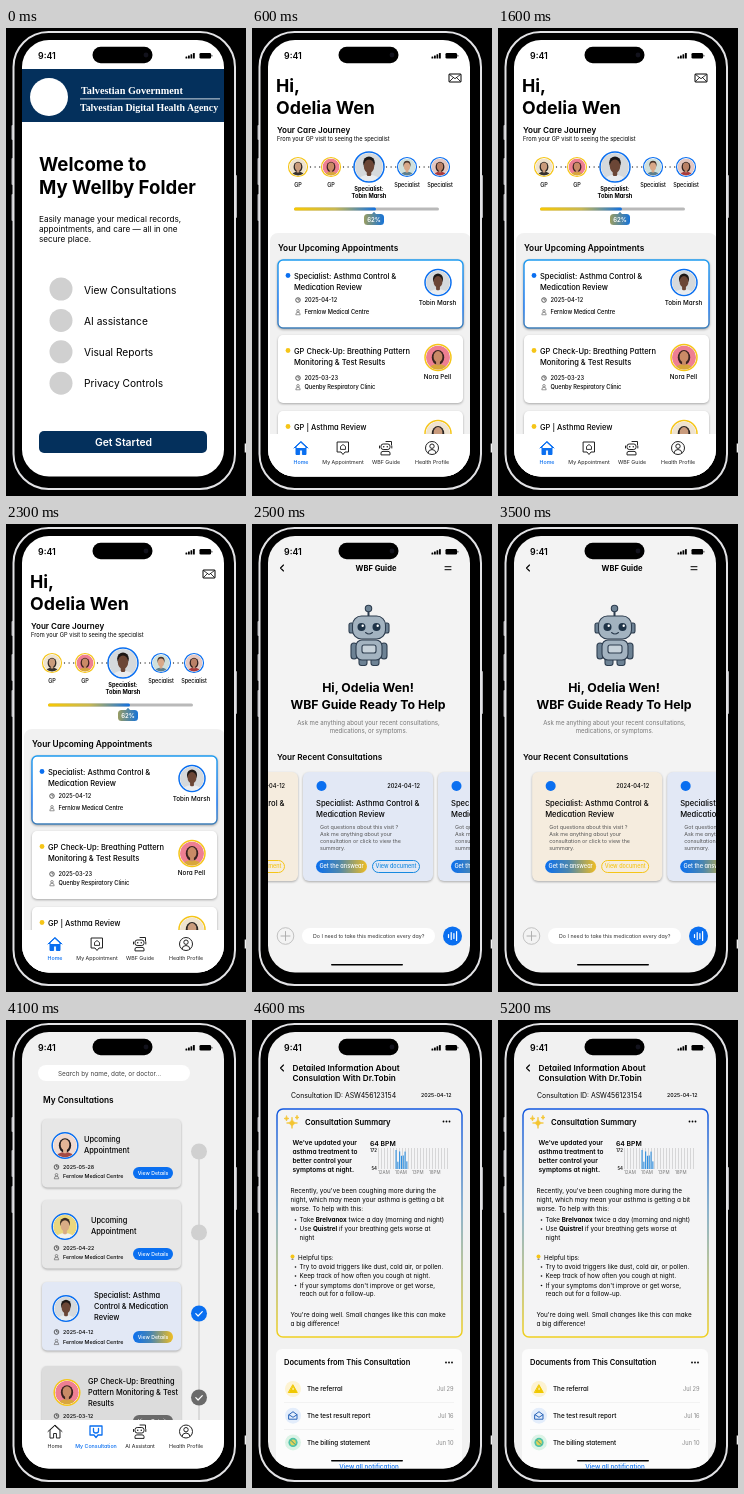
These frames come from a looping animation (240x468 px, 5.3 s). An HTML page:

```html
<!DOCTYPE html>
<html lang="en">
<head>
<meta charset="utf-8">
<title>Health app walkthrough</title>
<style>
html, body { margin: 0; width: 100%; height: 100%; overflow: hidden; background: #000; }
svg { display: block; width: 240px; height: 468px; }
text { font-family: Inter, "Open Sans", sans-serif; }
.serif { font-family: "Liberation Serif", "Noto Serif", serif; }
.screen { visibility: hidden; }
.round text { font-feature-settings: "cv11"; }
.round .plain { font-feature-settings: normal; }
.card { filter: drop-shadow(0 1px 1px rgba(0, 0, 0, .3)); }
#row { animation: slide 5300ms infinite; }
@keyframes slide {
  0%, 60.4% { transform: none; animation-timing-function: ease-in-out; }
  67.9%, 100% { transform: translateX(135px); }
}
</style>
</head>
<body>
<svg id="stage" viewBox="0 0 240 468"></svg>
<script>
const LOOP = 5300;
const BLUE = '#0a6ff0', GOLD = '#f5c518', INK = '#000', MUTED = '#777';

// Drawing helpers
const esc = s => s.replace(/&/g, '&amp;');
const text = (x, y, size, str, { w = 400, fill = INK, at = 'start', cls = '' } = {}) =>
  `<text x="${x}" y="${y}" font-size="${size}" font-weight="${w}" fill="${fill}" text-anchor="${at}" class="${cls}">${esc(str)}</text>`;
const lines = (x, ys, size, strs, opt) => strs.map((s, i) => text(x, ys[i], size, s, opt)).join('');
const rect = (x, y, w, h, r, fill, more = '') =>
  `<rect x="${x}" y="${y}" width="${w}" height="${h}" rx="${r}" fill="${fill}" ${more}/>`;
const dot = (x, y, r, fill, more = '') => `<circle cx="${x}" cy="${y}" r="${r}" fill="${fill}" ${more}/>`;
const path = (d, stroke = INK, sw = 1, fill = 'none') =>
  `<path d="${d}" fill="${fill}" stroke="${stroke}" stroke-width="${sw}" stroke-linecap="round" stroke-linejoin="round"/>`;
const dots = (x, y, gap, r, fill) => [0, 1, 2].map(i => dot(x + i * gap, y, r, fill)).join('');
const page = fill => rect(16, 12, 202, 437, 0, fill);
const grad = (id, stops, vertical) =>
  `<linearGradient id="${id}" x2="${vertical ? 0 : 1}" y2="${vertical ? 1 : 0}">${
    stops.map(([o, c]) => `<stop offset="${o}" stop-color="${c}"/>`).join('')}</linearGradient>`;

// Faceless portraits: backdrop, skin, hair, clothes, long hair
const PEOPLE = {
  veil: ['#efe3cf', '#c99b7c', '#2a2523', '#35302d', 1],
  pink: ['#ee7f92', '#c98a66', '#3a2220', '#d8a63c', 1],
  man: ['#d5d9dc', '#6b4636', '#1d1715', '#e9ecef', 0],
  pale: ['#cfe0dc', '#d8a888', '#4a352b', '#5d7f8c', 0],
  red: ['#e5c7c0', '#b98066', '#2b1d1c', '#a83a3c', 1],
  bob: ['#f0d9cf', '#e3b596', '#211a1a', '#a34b45', 1],
  sun: ['#ead77e', '#d9ac85', '#3b2b22', '#f2f2ee', 0]
};
function face(x, y, r, ring, who) {
  const [bg, skin, hair, cloth, long] = PEOPLE[who];
  return dot(x, y, r, '#fff', `stroke="${ring}" stroke-width="${r > 11 ? 1.5 : 1.2}"`) +
    `<g transform="translate(${x} ${y}) scale(${r - 1})" clip-path="url(#disc)">${dot(0, 0, 1, bg)}
    <ellipse cx="0" cy="${long ? 0 : -.3}" rx="${long ? .52 : .42}" ry="${long ? .62 : .45}" fill="${hair}"/>
    <ellipse cx="0" cy="1.05" rx=".8" ry=".5" fill="${cloth}"/>
    ${rect(-.16, .2, .32, .45, .1, skin)}<ellipse cx="0" cy="-.06" rx=".37" ry=".48" fill="${skin}"/></g>`;
}

const clock = (x, y) => dot(x, y, 2.3, 'none', 'stroke="#222" stroke-width=".7"') + path(`M${x} ${y - 1.3}V${y}H${x + 1.1}`, '#222', .6);
const person = (x, y) => dot(x, y - 1.2, 1.3, 'none', 'stroke="#555" stroke-width=".6"') +
  path(`M${x - 2.2} ${y + 2.4}q0 -2.3 2.2 -2.3t2.2 2.3z`, '#555', .6);
const meta = (x, y1, y2, size, date, place) =>
  clock(x, y1 - 2) + person(x, y2 - 2) + text(x + 6.5, y1, size, date, { w: 500 }) + text(x + 6.5, y2, size, place, { w: 500 });
const pill = (x, y, w, h, fill, label, size = 5.2) =>
  rect(x, y, w, h, h / 2, fill) + text(x + w / 2, y + h / 2 + 1.9, size, label, { w: 500, fill: '#fff', at: 'middle' });
const chevron = y => path(`M31.5 ${y - 3}l-3 3l3 3`, INK, 1.1);
const homeBar = rect(79, 440, 72, 1.6, .8, INK);

// Tab bar
const ICONS = {
  home: (x, y, c, on) => path(`M${x - 7} ${y}l7 -6.5l7 6.5M${x - 5} ${y - 1}v7.5h3.6v-4.5h2.8v4.5h3.6v-7.5l-5 -4.6z`, c, 1, on ? c : 'none'),
  visit: (x, y, c) => path(`M${x - 5.5} ${y - 6}h11v10h-3.5l-2 2.5l-2 -2.5h-3.5z`, c, 1) + path(`M${x - 2.5} ${y + 1}v-2.5l2.5 -2l2.5 2v2.5z`, c, .9),
  notes: (x, y, c) => path(`M${x - 6} ${y - 5.5}h12v9h-4l-2 2.5l-2 -2.5h-4z`, c, 1.3) + path(`M${x - 2.5} ${y - 3}v2.5q0 2 2.5 2t2.5 -2v-2.5`, c, 1.3),
  bot: (x, y, c) => rect(x - 5, y - 4, 9, 5.5, 2.2, 'none', `stroke="${c}"`) + dot(x - 2.3, y - 1.2, .8, c) + dot(x + 1.3, y - 1.2, .8, c) +
    path(`M${x} ${y - 6.5}h5.5v3.5M${x - 6.5} ${y - 2}v2M${x + 5.8} ${y - 2}v2M${x - 5} ${y + 6.5}v-1.5q0 -1.6 2 -1.6h5q2 0 2 1.6v1.5z`, c, 1),
  user: (x, y, c) => dot(x, y, 6.5, 'none', `stroke="${c}"`) + dot(x, y - 1.8, 2.2, 'none', `stroke="${c}"`) + path(`M${x - 4} ${y + 4.8}q.5 -3.3 4 -3.3t4 3.3`, c, 1)
};
const tabs = (top, iconY, labelY, items, active) => rect(16, top, 202, 52, 0, '#fff') +
  items.map(([x, icon, label], i) => {
    const on = i === active, c = on ? BLUE : '#222';
    return ICONS[icon](x, iconY, c, on) + text(x, labelY, 5.3, label, { fill: c, at: 'middle', w: on ? 500 : 400 });
  }).join('');

function welcome() {
  const items = ['View Consultations', 'AI assistance', 'Visual Reports', 'Privacy Controls'];
  const white = { w: 700, fill: '#fff', cls: 'serif' };
  return page('#fff') + rect(16, 41, 202, 53, 0, '#04305c') + dot(43, 69, 19, '#fff') +
    text(75, 66, 10.2, 'Talvestian Government', white) + rect(74, 70.5, 140, .8, 0, '#fff') +
    text(74, 83, 9.9, 'Talvestian Digital Health Agency', white) +
    lines(33, [142.5, 166], 18.6, ['Welcome to', 'My Wellby Folder'], { w: 700 }) +
    lines(33, [194, 204, 214], 8.2, ['Easily manage your medical records,', 'appointments, and care — all in one', 'secure place.']) +
    items.map((s, i) => dot(55, 261 + i * 31.4, 11.5, '#d0d0d0') + text(78, 265.5 + i * 31.2, 10.2, s)).join('') +
    rect(33, 403, 168, 22, 5, '#04305c') + text(117.5, 418, 10.4, 'Get Started', { w: 600, fill: '#fff', at: 'middle' });
}

function visitCard(y, color, title, who, name, info = '', lit = false) {
  return `<g class="card">${rect(26, y, 185, 68, 5, '#fff', lit ? 'stroke="url(#edge)" stroke-width="1.4"' : '')}</g>` +
    dot(36, y + 15.5, 2.4, color) + lines(42, [y + 18.5, y + 29.5], 7.5, title, { w: 500 }) + info +
    face(186, y + 22.5, 13, color, who) + text(185.5, y + (lit ? 45 : 44), 6.3, name, { w: 500, at: 'middle' });
}

function home() {
  const mid = { at: 'middle', w: 500 }, bold = { at: 'middle', w: 700 };
  const steps = [[46, 'veil', 'GP'], [79, 'pink', 'GP'], [155, 'pale', 'Specialist'], [188, 'red', 'Specialist']];
  return page('#fff') + lines(24, [64, 86], 17.8, ['Hi,', 'Odelia Wen'], { w: 700, cls: 'plain' }) +
    rect(197, 46, 12, 8, .5, 'none', 'stroke="#000" stroke-width="1"') + path('M197.5 46.5l5.5 4.2l5.5 -4.2M197.5 53.5l4 -4M208.5 53.5l-4 -4', INK, .8) +
    text(25, 104.5, 8.1, 'Your Care Journey', { w: 600 }) +
    text(25, 113, 5.7, 'From your GP visit to seeing the specialist') +
    steps.map(([x, who, s], i) => face(x, 139, 9.5, i < 2 ? GOLD : BLUE, who) + text(x, 159, 5.5, s, mid)).join('') +
    face(117, 139, 15, BLUE, 'man') +
    [58.5, 91.5, 134.5, 167.5].map(x => dots(x, 139, 4.6, .65, '#333')).join('') +
    lines(117, [163, 170], 5.7, ['Specialist:', 'Tobin Marsh'], bold) +
    rect(42, 179.4, 145, 3, 1.5, '#b9b9b9') + rect(42, 179.4, 82, 3, 1.5, 'url(#warm)') +
    path('M119.5 187l2.5 -3l2.5 3z', '#4c86ad', .5, '#4c86ad') + rect(112, 186, 20, 11, 3.5, 'url(#badge)') +
    text(122, 193.8, 6, '62%', { w: 600, fill: '#fff', at: 'middle' }) +
    rect(18, 205, 201, 210, 8, '#f1f1f1') + text(26, 223, 8.3, 'Your Upcoming Appointments', { w: 600 }) +
    visitCard(232, BLUE, ['Specialist: Asthma Control &', 'Medication Review'], 'man', 'Tobin Marsh',
      meta(46, 274, 286, 5.7, '2025-04-12', 'Fernlow Medical Centre'), true) +
    visitCard(307, GOLD, ['GP Check-Up: Breathing Pattern', 'Monitoring & Test Results'], 'pink', 'Nora Pell',
      meta(46, 352, 361, 5.7, '2025-03-23', 'Quenby Respiratory Clinic')) +
    visitCard(383, GOLD, ['GP | Asthma Review'], 'veil', '') +
    tabs(406, 420, 436, [[49, 'home', 'Home'], [91, 'visit', 'My Appointment'], [134, 'bot', 'WBF Guide'], [180, 'user', 'Health Profile']], 0);
}

function robot() {
  const line = '#2d3d4f', metal = '#a3b3c0', dark = '#6d8294', s = `stroke="${line}" stroke-width="1.1"`;
  return path('M116.5 87v6', line, 2) + dot(116.5, 84.5, 3.2, dark, s) +
    rect(97, 99, 5, 10, 2, dark, s) + rect(132, 99, 5, 10, 2, dark, s) +
    rect(99, 119, 6, 16, 3, dark, s) + rect(129, 119, 6, 16, 3, dark, s) +
    rect(107, 132, 8, 9.5, 2.5, dark, s) + rect(119, 132, 8, 9.5, 2.5, dark, s) +
    rect(104, 116, 26, 20, 6, metal, s) + rect(110, 121, 14, 8, 2, '#c7d2da', s) +
    rect(100.5, 92, 33, 23, 9, metal, s) +
    [109.5, 124.5].map(x => dot(x, 103, 4, '#1f3448') + dot(x + 1.2, 101.7, 1.2, '#fff')).join('') + path('M113.5 108.5q3.5 3 7 0', line, 1.1);
}

function chatCard(x, fill, edge) {
  return `<g class="card">${rect(x, 248, 130, 109, 6, fill)}</g>` + dot(x + 18.5, 262, 5, BLUE) +
    text(x + 117, 264, 5.7, '2024-04-12', { w: 500, at: 'end' }) +
    lines(x + 13, [282, 293], 7.6, ['Specialist: Asthma Control &', 'Medication Review'], { w: 500 }) +
    lines(x + 17, [304.5, 311.5, 318.5, 325.5], 5.4, ['Got questions about this visit ?', 'Ask me anything about your',
      'consultation or click to view the', 'summary.'], { fill: '#555' }) +
    pill(x + 13, 336, 51, 13, 'url(#cool)', 'Get the answear', 5.6) +
    rect(x + 69.5, 336.5, 47, 12, 6, 'none', `stroke="${edge}"`) + text(x + 93, 344.4, 5.5, 'View document', { w: 500, fill: edge, at: 'middle' });
}

function buddy() {
  const mid = w => ({ w, at: 'middle', cls: 'plain' });
  return page('#f3f3f3') + chevron(44) + text(124, 47, 7.6, 'WBF Guide', mid(700)) +
    path('M193 42.7h6M193 45.7h6', INK, 1) + robot() +
    lines(116, [168, 185], 12.3, ['Hi, Odelia Wen!', 'WBF Guide Ready To Help'], mid(700)) +
    lines(116.5, [201, 209], 6.1, ['Ask me anything about your recent consultations,', 'medications, or symptoms.'], { at: 'middle', fill: MUTED, cls: 'plain' }) +
    text(25, 236, 8.2, 'Your Recent Consultations', { w: 600 }) +
    `<g id="row">${chatCard(-84, '#f5ecde', GOLD)}${chatCard(51, '#e2e8f5', '#1689e0')}${chatCard(186, '#e2e8f5', '#1689e0')}</g>` +
    dot(33.5, 412, 8.3, 'none', 'stroke="#bbb" stroke-width=".9"') + path('M29 412h9M33.5 407.5v9', '#aaa', .9) +
    rect(50, 404, 133, 16, 8, '#fff') + text(61, 414, 5.3, 'Do I need to take this medication every day?', { fill: '#333' }) +
    dot(200.5, 412, 9.5, BLUE) + path('M196.5 410.5v3M199.2 408.5v7M201.9 409.5v5M204.6 407.5v9', '#fff', 1.2) + homeBar;
}

function consults() {
  // top, fill, portrait, portrait x, title x, first baseline, title, date, button fill, meta shift
  const cards = [
    [99, '#e7e7e7', 'bob', 59, 78, 122, ['Upcoming', 'Appointment'], '2025-05-28', BLUE, 0],
    [180, '#e7e7e7', 'sun', 59, 85, 202.5, ['Upcoming', 'Appointment'], '2025-04-22', BLUE, 0],
    [262, '#e2e8f5', 'man', 60, 88, 278, ['Specialist: Asthma', 'Control & Medication', 'Review'], '2025-04-12', 'url(#cool)', 2],
    [346, '#dcdcdc', 'pink', 61, 82, 364, ['GP Check-Up: Breathing', 'Pattern Monitoring & Test', 'Results'], '2025-03-12', '#6a6a6a', 2]
  ];
  return page('#f1f1f1') + rect(32, 45, 152, 16, 8, '#fff') +
    text(52, 55.5, 6.4, 'Search by name, date, or doctor...', { fill: '#444' }) +
    text(37, 82.5, 8.3, 'My Consultations', { w: 600 }) + rect(192.4, 132, 1.2, 270, 0, '#cacaca') +
    cards.map(([y, fill, who, fx, tx, ty, title, date, btn, sh], i) =>
      `<g class="card">${rect(36, y, 139, 68.5, 5, fill)}</g>` +
      face(fx, y + 26.5, 12.8, i === 3 ? GOLD : BLUE, who) + lines(tx, [ty, ty + 11, ty + 22], 7.4, title, { w: 500 }) +
      meta(50.5, y + 50 + sh, y + 59 + sh * 1.4, 5.3, date, 'Fernlow Medical Centre') + pill(127, y + 48 + sh / 2, 40, 12, btn, 'View Details') +
      dot(193, y + 32.5 - sh / 2, 8, ['#d0d0d0', '#d0d0d0', BLUE, '#6a6a6a'][i]) +
      (i > 1 ? path(`M189.8 ${y + 31.7}l2.3 2.3l4.2 -4.4`, '#fff', 1.2) : '')).join('') +
    tabs(400, 411.5, 428, [[49, 'home', 'Home'], [90, 'notes', 'My Consultation'], [134, 'bot', 'AI Assistant'], [180, 'user', 'Health Profile']], 1);
}

function chart() {
  let s = '';
  for (let i = 0; i < 24; i++) s += rect(126 + i * 3, 128, .6, 21, 0, '#c2c2c4');
  for (let i = 0; i < 7; i++) {
    const h = 4 + 15 * Math.abs(Math.cos(i * 1.35));
    s += rect(143.5 + i * 1.8, 149 - h, 1.1, h, 0, '#2f8fe0');
  }
  return s + text(118, 126, 6.8, '64 BPM', { w: 600 }) + text(125, 132, 4.4, '172', { at: 'end', w: 500 }) + text(125, 150, 4.4, '54', { at: 'end', w: 500 }) +
    ['12AM', '10AM', '13PM', '18PM'].map((l, i) => text(126 + i * 17, 154, 4.5, l, { fill: MUTED })).join('');
}

const spark = (x, y, r, c) => path(`M${x} ${y - r}Q${x} ${y} ${x + r} ${y}Q${x} ${y} ${x} ${y + r}Q${x} ${y} ${x - r} ${y}Q${x} ${y} ${x} ${y - r}z`, c, .7, c);
const bold = s => `<tspan font-weight="700">${s}</tspan>`;

function detail() {
  const rows = [['The referral', 'Jul 29', '#fdf3d2'], ['The test result report', 'Jul 16', '#e3edfb'], ['The billing statement', 'Jun 10', '#dcf3e6']];
  const bullets = [[202, `Take ${bold('Brelvanox')} twice a day (morning and night)`], [211, `Use ${bold('Quistrel')} if your breathing gets worse at`],
    [249, 'Try to avoid triggers like dust, cold air, or pollen.'], [258, 'Keep track of how often you cough at night.'],
    [267.5, "If your symptoms don't improve or get worse,"]];
  return page('#f1f1f1') + chevron(48) +
    lines(40.5, [50.5, 61], 8.2, ['Detailed Information About', 'Consulation With Dr.Tobin'], { w: 600 }) +
    text(39, 78, 6.9, 'Consultation ID: ASW456123154') + text(199.5, 77.3, 5.3, '2025-04-12', { w: 500, at: 'end' }) +
    rect(25, 89, 185, 228, 6, '#f4f4f5', 'stroke="url(#frame)" stroke-width="1.5"') +
    spark(40, 103, 5.5, '#f4c430') + spark(34.5, 98.5, 2.5, '#f4c430') + spark(45, 97.5, 2, '#f4c430') +
    text(53, 105, 7.7, 'Consultation Summary', { w: 600 }) + dots(191.5, 101.5, 3, .9, INK) +
    lines(40.5, [125, 134, 143, 152], 6.6, ["We've updated your", 'asthma treatment to', 'better control your', 'symptoms at night.'], { w: 600 }) + chart() +
    lines(38.5, [172.5, 182, 191], 6.35, ["Recently, you've been coughing more during the", 'night, which may mean your asthma is getting a bit', 'worse. To help with this:']) +
    bullets.map(([y, s]) => dot(43.5, y - 2, .8, INK) + text(47.5, y, 6.3, s)).join('') + text(47.5, 220, 6.3, 'night') +
    dot(40.5, 236.5, 2, GOLD) + rect(39.5, 238.4, 2, 1.7, .5, '#888') + text(46, 239.5, 6.3, 'Helpful tips:') +
    text(47.5, 276, 6.3, 'reach out for a follow-up.') +
    lines(38.5, [297, 305.5], 6.35, ["You're doing well. Small changes like this can make", 'a big difference!']) +
    rect(24, 329, 186, 130, 6, '#fcfcfc') + text(32, 344.7, 7.5, 'Documents from This Consultation', { w: 600 }) + dots(194, 342.5, 3, .9, INK) +
    rows.map(([s, d, bg], i) => {
      const y = 369 + i * 26.7;
      const icon = [path(`M41 ${y - 4}l4.3 7.5h-8.6z`, '#f0c800', 1, '#f0c800') + rect(40.6, y - 1.5, .9, 2.6, .4, '#fff'),
        path(`M37 ${y - 1}l4 -3l4 3v4.5h-8zl4 2.6l4 -2.6`, '#2763b8', 1),
        dot(41, y, 4.6, '#4fc3a8') + dot(41, y, 2.8, '#e4d35a') + path(`M39 ${y - 2}l4 4`, '#2f9c86', 1)][i];
      return dot(41, y, 8, bg) + icon + text(55, y + 2.3, 6.3, s, { w: 500 }) + text(201.5, y + 2.2, 5.7, d, { fill: '#888', at: 'end' }) +
        (i < 2 ? rect(32, y + 13.3, 170, .6, 0, '#ececec') : '');
    }).join('') + text(117, 449, 6.3, 'View all notification', { w: 500, fill: BLUE, at: 'middle' }) + homeBar;
}

const status = text(32, 31.3, 8.8, '9:41', { w: 600 }) +
  [0, 1, 2, 3].map(i => rect(179.5 + i * 2.5, 28.6 - i * 1.2, 1.8, 2 + i * 1.2, .4, INK)).join('') +
  rect(193.5, 25, 11.5, 5.6, 1.3, INK) + rect(205.5, 26.7, .8, 2, .4, INK) +
  rect(86.5, 18.8, 60, 16.4, 8.2, '#000') + dot(140, 27, 2.4, '#12121c');

const shell = [[5.5, 97, 15], [5.5, 130, 27], [5.5, 166, 27], [229, 147, 43]].map(([x, y, h]) => rect(x, y, 2, h, 1, '#b0b0b4')).join('') +
  rect(7.5, 4, 221.5, 457, 35, '#000', 'stroke="#e2e2e5" stroke-width="2"') + rect(238.7, 415.5, 1.3, 9, 0, '#f0f0f0');

const defs = `<defs><clipPath id="disc"><circle r="1"/></clipPath>
  <clipPath id="glass"><rect x="16" y="12" width="202" height="436.5" rx="27"/></clipPath>
  ${grad('warm', [[0, '#f8c800'], [.5, '#c9b850'], [1, '#0f6fe0']])}${grad('badge', [[0, '#9a9d62'], [1, '#1673d8']])}
  ${grad('cool', [[0, BLUE], [.45, '#4b86ae'], [1, '#f0bd22']])}${grad('edge', [[0, '#1d9bf0'], [.7, BLUE], [1, '#3f7fb8']], true)}
  ${grad('frame', [[0, '#1258e0'], [.45, '#6d9fc0'], [1, '#f0d020']], true)}</defs>`;

// Each screen is shown from its own time until the next one starts
const screens = [[0, welcome], [400, home], [2400, buddy], [3800, consults], [4500, detail]];
const pct = ms => (ms / LOOP * 100).toFixed(3) + '%';
let css = '', body = '';
screens.forEach(([from, draw], i) => {
  const to = i + 1 < screens.length ? screens[i + 1][0] : LOOP;
  css += `@keyframes s${i} { ${from ? '0% { visibility: hidden }' : ''} ${pct(from)} { visibility: visible } ${
    to < LOOP ? pct(to) + ' { visibility: hidden }' : ''} 100% { visibility: ${to < LOOP ? 'hidden' : 'visible'} } }\n`;
  body += `<g class="screen ${i ? 'round' : ''}" style="animation: s${i} ${LOOP}ms step-end infinite">${draw()}</g>`;
});
document.head.appendChild(document.createElement('style')).textContent = css;
document.getElementById('stage').innerHTML = defs + shell + `<g clip-path="url(#glass)">${body}${status}</g>`;
</script>
</body>
</html>
```
